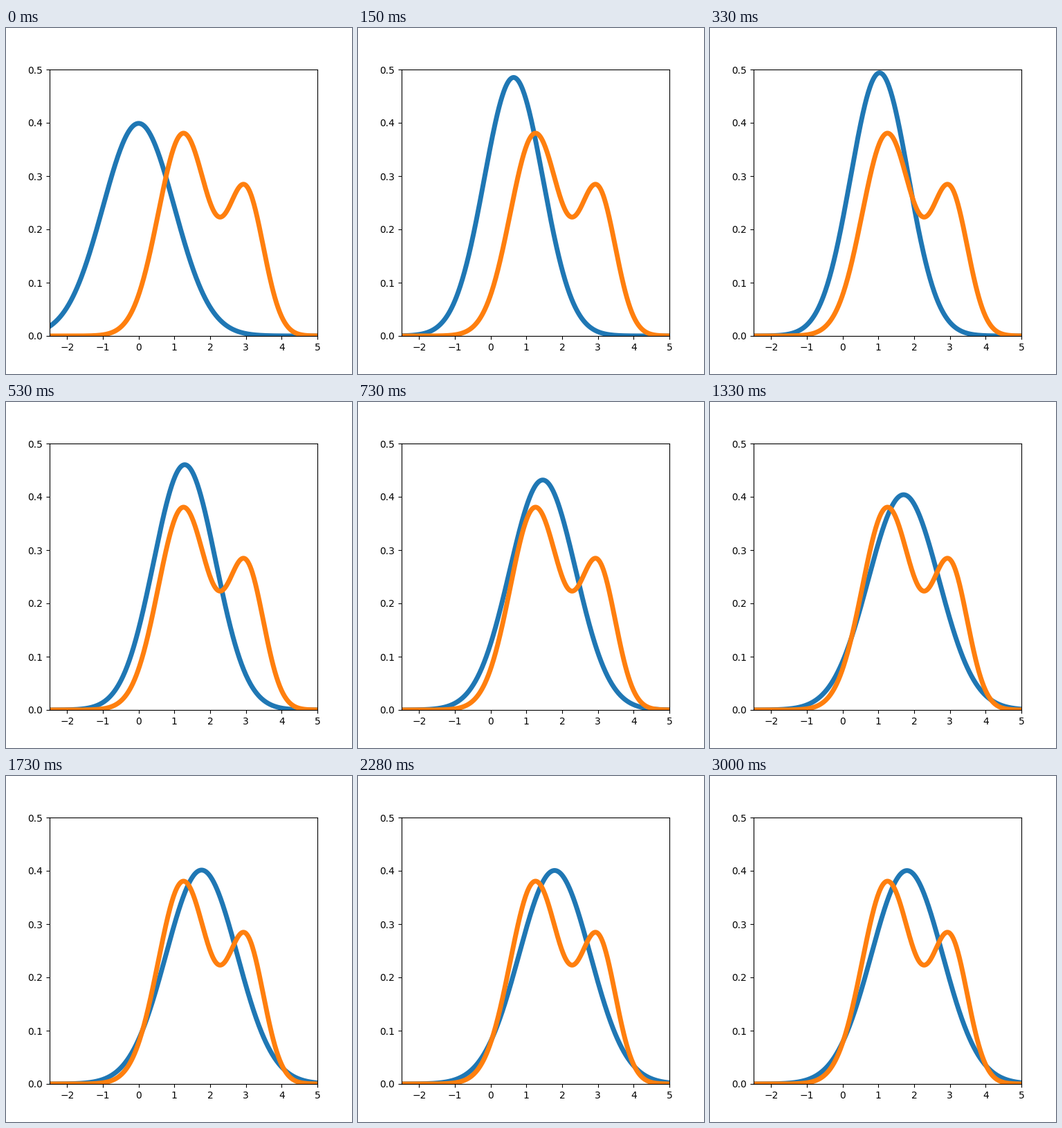
These frames come from a looping animation (500x500 px, 3.02 s). A matplotlib script:

```python
import numpy as np
import matplotlib.pyplot as plt
from matplotlib.animation import FuncAnimation

LOOP_MS, TICK_MS = 3020, 10
STEPS = 120
RATE = 0.053


def gauss(x, mu, sigma):
    return np.exp(-0.5 * ((x - mu) / sigma) ** 2) / (sigma * np.sqrt(2 * np.pi))


def mixture(x):
    return 2 / 3 * gauss(x, 1.25, 0.7) + gauss(x, 3, 0.5) / 3


def descend(mu, sigma, steps):
    """Gradient descent on KL(q || p) for a normal q and the mixture p."""
    z = np.linspace(-6, 6, 1201)
    weight = gauss(z, 0, 1) * (z[1] - z[0])
    path = [(mu, sigma)]
    for _ in range(steps):
        x = mu + sigma * z
        a = 2 / 3 * gauss(x, 1.25, 0.7)
        b = gauss(x, 3, 0.5) / 3
        score = -(a * (x - 1.25) / 0.49 + b * (x - 3) / 0.25) / (a + b)
        mu += RATE * np.sum(weight * score)
        sigma += RATE * (1 / sigma + np.sum(weight * score * z))
        path.append((mu, sigma))
    return path


path = descend(0.0, 1.0, STEPS)
xs = np.linspace(-2.5, 5, 500)

fig, ax = plt.subplots(figsize=(5, 5), dpi=100)
ax.set_xlim(-2.5, 5)
ax.set_ylim(0, 0.5)
curve, = ax.plot(xs, gauss(xs, *path[0]), lw=5)
ax.plot(xs, mixture(xs), lw=5)


def update(i):
    # steps alternate between 30 and 20 ms
    pairs, rest = divmod(i * TICK_MS, 50)
    step = min(2 * pairs + (rest >= 30), STEPS)
    curve.set_ydata(gauss(xs, *path[step]))
    return curve,


anim = FuncAnimation(fig, update, frames=LOOP_MS // TICK_MS,
                     interval=TICK_MS, repeat=True, repeat_delay=0)
plt.show()
```
